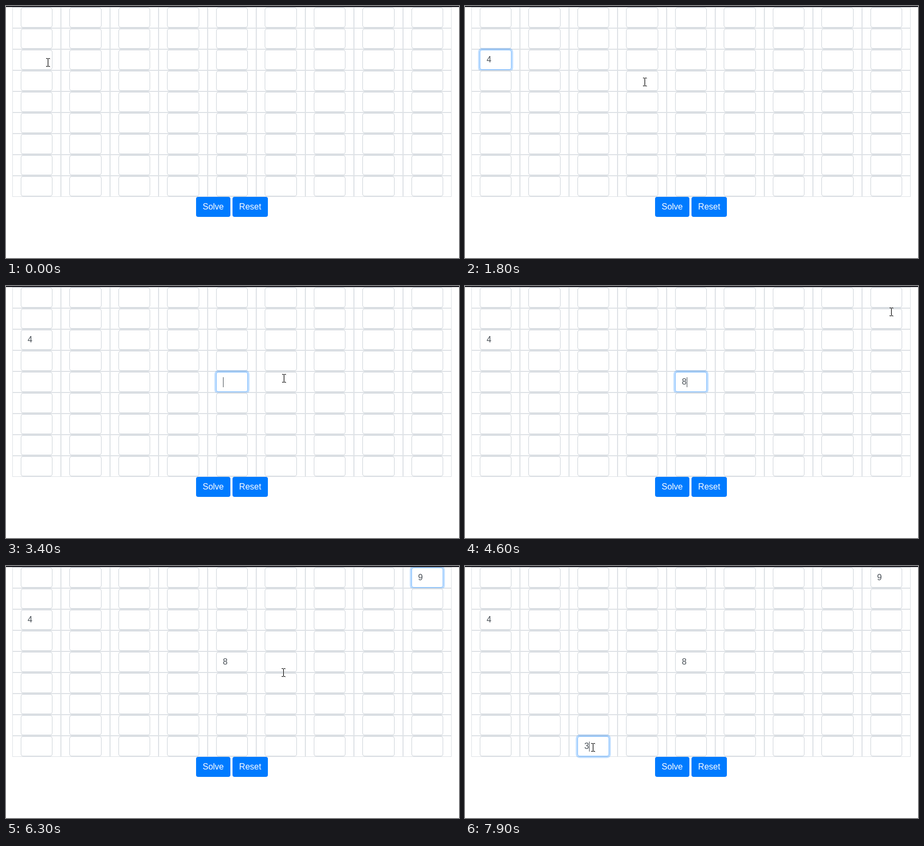
Recreate the animation shown at these times as an HTML page. Size 858 by 478 pixels, loop 8000 ms.

```html
<!DOCTYPE html>
<html lang="en">
<head>
<meta charset="utf-8">
<title>Number grid</title>
<style>
  html, body { margin: 0; width: 100%; height: 100%; overflow: hidden; background: #fff; }
  body { position: relative; font: 16px/24px "Liberation Sans", Arial, sans-serif; }
  * { box-sizing: border-box; }
  #bar { position: absolute; left: 0; top: 0; width: 858px; height: 2px; background: #16161d; z-index: 2; }
  #grid { position: absolute; left: 12px; top: 2px; width: 832px; }
  .row { display: flex; height: 40px; }
  .cell { flex: 1 1 0; min-width: 0; padding: 0 15px; border: 1px solid #dee2e6; }
  .box { height: 38px; padding: 6px 12px; border: 1px solid #ced4da; border-radius: 4px;
         background: #fff; color: #495057; }
  #buttons { position: absolute; left: 360px; top: 362px; display: flex; gap: 4px; }
  .btn { display: flex; justify-content: center; width: 65px; height: 38px; padding-top: 7px;
         border-radius: 4px; background: #007bff; color: #fff; }
  .btn + .btn { width: 67px; }
  #caret { position: absolute; width: 1px; height: 19px; background: #495057; z-index: 3; }
  #pointer { position: absolute; left: 0; top: 0; width: 10px; height: 20px; z-index: 4; }
</style>
</head>
<body>
<div id="bar"></div>
<div id="grid"></div>
<div id="buttons"><span class="btn">Solve</span><span class="btn">Reset</span></div>
<div id="caret"></div>
<svg id="pointer" viewBox="-4 -9 10 20" fill="none">
  <defs><path id="beam" d="M-3 -7.5H0M1 -7.5H4M.5 -7V7M-3 7.5H0M1 7.5H4"/></defs>
  <use href="#beam" x="1" y="1" stroke="#000" stroke-opacity=".3"/>
  <use href="#beam" stroke="#fff" stroke-width="2"/>
  <use href="#beam" stroke="#000"/>
</svg>
<script>
const LOOP = 8000, STEP = 100, SIZE = 9, PITCH = 832 / SIZE, ROW = 40, DIGIT_W = 8.9;
const $ = id => document.getElementById(id);

// off: when the caret blinks out
const entries = [
  { col: 0, row: 2, focus: 500,  typed: 1400, digit: '4', off: [1700, 2900] },
  { col: 4, row: 4, focus: 2900, typed: 3600, digit: '8' },
  { col: 8, row: 0, focus: 5300, typed: 6000, digit: '9', off: [6300, 6800] },
  { col: 2, row: 8, focus: 7100, typed: 7900, digit: '3' }
];

// pointer strokes: first step, last step, end point
const home = [79, 107];
const moves = [
  [1600, 2000, 414, 154],
  [2300, 2400, 453, 160],
  [2600, 2600, 425, 178],
  [3300, 3400, 526, 175],
  [3500, 3600, 523, 170],
  [4000, 4600, 807, 49],
  [4700, 5200, 806, 34],
  [6200, 6700, 230, 379],
  [6800, 6900, 243, 345],
  [7000, 7000, 242, 344]
];

const boxes = [];
function add(parent, name) {
  const el = parent.appendChild(document.createElement('div'));
  el.className = name;
  return el;
}
for (let r = 0; r < SIZE; r++) {
  const row = add($('grid'), 'row');
  for (let c = 0; c < SIZE; c++) boxes.push(add(add(row, 'cell'), 'box'));
}

const mix = (a, b, k) => a + (b - a) * k;
const easeOut = k => 1 - (1 - k) ** 1.65;

function pointerAt(t) {
  let [x, y] = home;
  for (const [first, last, endX, endY] of moves) {
    if (t < first) break;
    const k = easeOut(Math.min(1, (t - first + STEP) / (last - first + STEP)));
    x = mix(x, endX, k);
    y = mix(y, endY, k);
  }
  return [Math.round(x), Math.round(y)];
}

// two-step fade of the focus ring
const ramp = (t, start) => t < start ? 0 : t < start + STEP ? 0.6 : 1;

function paintBox(box, k, text) {
  const border = [[206, 128], [212, 189], [218, 255]].map(([a, b]) => Math.round(mix(a, b, k)));
  box.style.borderColor = `rgb(${border})`;
  box.style.boxShadow = k ? `0 0 0 ${3.2 * k}px rgba(0,123,255,${0.25 * k})` : 'none';
  if (box.textContent !== text) box.textContent = text;
}

function paintCaret(t, entry) {
  const caret = $('caret').style;
  const off = entry && entry.off;
  const hidden = !entry || off && t >= off[0] && t < off[1];
  caret.display = hidden ? 'none' : 'block';
  if (hidden) return;
  const x = 41 + entry.col * PITCH + (t >= entry.typed ? DIGIT_W : 0);
  caret.left = Math.ceil(x) + 'px';
  caret.top = 13 + entry.row * ROW + 'px';
}

function render(time) {
  const t = Math.floor(time % LOOP / STEP) * STEP;
  entries.forEach((e, i) => {
    const next = entries[i + 1];
    const level = ramp(t, e.focus) - (next ? ramp(t, next.focus) : 0);
    paintBox(boxes[e.row * SIZE + e.col], level, t >= e.typed ? e.digit : '');
  });
  paintCaret(t, entries.filter(e => t >= e.focus).pop());
  const [x, y] = pointerAt(t);
  $('pointer').style.transform = `translate(${x - 4}px, ${y - 9}px)`;
}

const start = performance.now();
function tick() {
  render(performance.now() - start);
  requestAnimationFrame(tick);
}
render(0);
requestAnimationFrame(tick);
</script>
</body>
</html>
```
